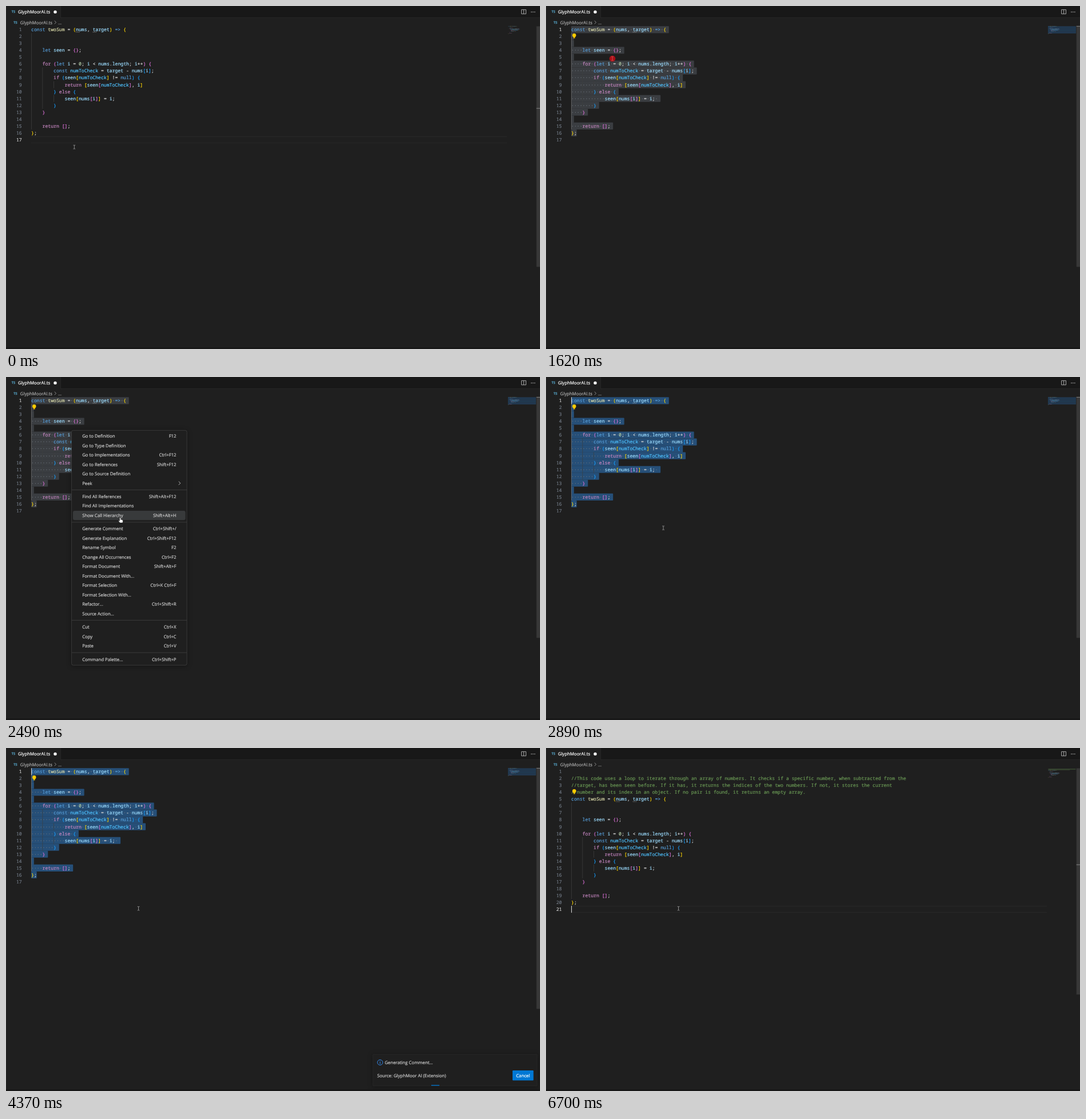
These frames come from a looping animation (933x600 px, 6.84 s). An HTML page:

```html
<!DOCTYPE html>
<html lang="en">
<head>
<meta charset="utf-8">
<title>Comment generator demo</title>
<style>
  html, body { margin: 0; width: 100%; height: 100%; overflow: hidden; background: #1f1f1f; }
  svg { display: block; width: 933px; height: 600px; }
  text { white-space: pre; text-rendering: geometricPrecision; font: 7.75px "Open Sans", "Noto Sans", sans-serif; }
  text, tspan { fill: currentColor; stroke: currentColor; stroke-width: .2px; }
  .code { font: 8.13px "Noto Sans Mono", "DejaVu Sans Mono", monospace; }
  .badge { font-size: 5.8px; font-weight: 700; }
  .end { text-anchor: end; }
  .mid { text-anchor: middle; }
  .shadow { filter: drop-shadow(0 1.3px 4px rgba(0, 0, 0, .36)); }
</style>
</head>
<body>
<svg viewBox="0 0 933 600" xmlns="http://www.w3.org/2000/svg">
  <rect width="933" height="600" fill="#1f1f1f"/>
  <g id="editor"></g>
  <g id="caret"></g>
  <g id="bulb"></g>
  <g id="chrome"></g>
  <g id="toast"></g>
  <rect y="597" width="933" height="3" fill="#181818"/>
  <g id="menu"></g>
  <g id="mouse"></g>
</svg>
<script>
const LOOP = 6840, LINE = 12.04, CHAR = 4.878, TOP = 35.3, LEFT = 44;
const T = {
  press: 400, release: 1340, bulb: 1500, rightClick: 1550, menu: 1740,
  pick: 2700, menuClose: 2880, toast: 2930, insert: 5510,
  bulbMove: 5770, toastEnd: 5580, clear: 6700
};

const CODE = `const twoSum = (nums, target) => {


    let seen = {};

    for (let i = 0; i < nums.length; i++) {
        const numToCheck = target - nums[i];
        if (seen[numToCheck] != null) {
            return [seen[numToCheck], i]
        } else {
            seen[nums[i]] = i;${' '}
        }
    }

    return [];
};
`.split('\n');

const COMMENT = [
  '',
  '//This code uses a loop to iterate through an array of numbers. It checks if a specific number, when subtracted from the',
  '//target, has been seen before. If it has, it returns the indices of the two numbers. If not, it stores the current',
  '//number and its index in an object. If no pair is found, it returns an empty array.'
];

// Indent guides, outermost first: column, first line, last line
const GUIDES = [[0, 2, 15], [4, 7, 12], [8, 9, 9], [8, 11, 11]];

const MENU = [
  ['Go to Definition|F12', 'Go to Type Definition', 'Go to Implementations|Ctrl+F12', 'Go to References|Shift+F12',
    'Go to Source Definition', 'Peek|>'],
  ['Find All References|Shift+Alt+F12', 'Find All Implementations', 'Show Call Hierarchy|Shift+Alt+H'],
  ['Generate Comment|Ctrl+Shift+/', 'Generate Explanation|Ctrl+Shift+F12', 'Rename Symbol|F2',
    'Change All Occurrences|Ctrl+F2', 'Format Document|Shift+Alt+F', 'Format Document With...',
    'Format Selection|Ctrl+K Ctrl+F', 'Format Selection With...', 'Refactor...|Ctrl+Shift+R', 'Source Action...'],
  ['Cut|Ctrl+X', 'Copy|Ctrl+C', 'Paste|Ctrl+V'],
  ['Command Palette...|Ctrl+Shift+P']
];

// Pointer path: time, x, y
const PATH = [
  [70, 119.3, 246.7], [330, 56, 222], [430, 56, 222], [730, 40, 106], [870, 37, 67], [1100, 37, 32],
  [1400, 37, 40], [1560, 116, 92], [1720, 116, 92], [2160, 183, 190.5], [2600, 205, 264],
  [2960, 205, 264], [3500, 231.5, 280.7]
];

const cache = {};
function put(id, markup) {
  if (cache[id] === markup) return;
  cache[id] = markup;
  document.getElementById(id).innerHTML = markup;
}

const esc = s => s.replace(/&/g, '&amp;').replace(/</g, '&lt;');
const rect = (x, y, w, h, fill, more = '') =>
  `<rect x="${x}" y="${y}" width="${w}" height="${h}" fill="${fill}" ${more}/>`;
const text = (x, y, s, color = '#ccc', cls = '') =>
  `<text x="${x}" y="${y}" class="${cls}" style="color:${color}">${s}</text>`;
const stroke = (d, color, width = 1) =>
  `<path d="${d}" fill="none" stroke="${color}" stroke-width="${width}"/>`;
const dots = (x, y, gap, r, fill) =>
  [0, 1, 2].map(i => `<circle cx="${x + i * gap}" cy="${y}" r="${r}" fill="${fill}"/>`).join('');
const lineTop = n => TOP + (n - 1) * LINE;

// Syntax colours, with bracket pairs coloured by depth
const COLORS = { const: '#569cd6', let: '#569cd6', null: '#569cd6', '=>': '#569cd6', twoSum: '#dcdcaa',
  for: '#c586c0', if: '#c586c0', else: '#c586c0', return: '#c586c0', numToCheck: '#4fc1ff', 0: '#b5cea8' };
const PAIRS = ['#ffd700', '#da70d6', '#179fff'];
let depth = 0;
function tokenize(line) {
  return (line.match(/\w+|=>|[()[\]{}]|\s+|[^\w\s()[\]{}]/g) || []).map(s => {
    let color = COLORS[s] || (/^\w/.test(s) ? '#9cdcfe' : '#d4d4d4');
    if (/[([{]/.test(s)) color = PAIRS[depth++ % 3];
    if (/[)\]}]/.test(s)) color = PAIRS[--depth % 3];
    return [s, color];
  });
}
const codeTokens = CODE.map(tokenize);
const commentTokens = COMMENT.map(s => [[s, '#6a9955']]);

function pointer(t) {
  const next = PATH.findIndex(p => p[0] > t);
  if (next === 0) return PATH[0].slice(1);
  if (next < 0) return PATH[PATH.length - 1].slice(1);
  const [t0, x0, y0] = PATH[next - 1], [t1, x1, y1] = PATH[next];
  const k = (t - t0) / (t1 - t0);
  return [x0 + (x1 - x0) * k, y0 + (y1 - y0) * k];
}

function activeLine(t) {
  if (t < T.press) return 17;
  if (t < 1100) {
    const y = pointer(t - 25)[1];
    return Math.max(1, Math.min(16, Math.floor((y - TOP) / LINE) + 1));
  }
  return t < T.insert ? 1 : t < T.clear ? 5 : 21;
}

// The innermost block around the caret gets a brighter guide
function drawGuides(active, shift) {
  const line = active - shift;
  const inner = GUIDES.filter(([, from, to]) => line >= from - 1 && line <= to + 1).pop();
  return GUIDES.map(g => {
    const [col, from, to] = g;
    return rect(LEFT + col * CHAR, lineTop(from + shift), .7, (to - from + 1) * LINE, g === inner ? '#707070' : '#404040');
  }).join('');
}

function drawEditor(active, shift, focused) {
  const lines = shift ? commentTokens.concat(codeTokens) : codeTokens;
  const last = 16 + shift;
  const selecting = active < last;
  const selected = n => selecting && n >= active && n <= last;
  let under = '', over = '', map = '';

  if (!selecting) {
    for (const y of [lineTop(active), lineTop(active + 1) - 1.2])
      under += rect(LEFT, y, 831, 1.2, '#272727');
  }
  lines.forEach((tokens, i) => {
    const n = i + 1, y = lineTop(n) + 8.9, length = tokens.reduce((sum, k) => sum + k[0].length, 0);
    const mapY = 35.4 + i * .84;
    if (selected(n)) {
      const width = (length + (n < last ? 1 : 0)) * CHAR;
      under += rect(LEFT, lineTop(n), width, LINE + .05, focused ? '#264f78' : '#3a3d41', 'rx="1"');
      map += rect(877, mapY, n < last ? 49 : 1, .84, '#264f78', 'opacity=".6"');
    }
    over += text(27.7, y, n, n === active ? '#ccc' : '#6e7681', 'code end');
    let col = 0, spans = '';
    for (const [s, color] of tokens) {
      const blank = !s.trim();
      const shown = blank && selected(n) ? '·'.repeat(s.length) : s;
      spans += `<tspan style="color:${blank ? '#6f777f' : color}">${esc(shown)}</tspan>`;
      if (!blank) map += rect(877.5 + col * .45, mapY, Math.min(s.length * .45, 48), .65, color, 'opacity=".42"');
      col += s.length;
    }
    if (spans) over += `<text class="code" x="${LEFT}" y="${y}">${spans}</text>`;
  });

  const hintY = lineTop(1 + shift) + 10.4;
  const hints = [16, 22].map(c => dots(LEFT + c * CHAR + 1, hintY, 2.4, .6, '#a8a8a8')).join('');

  // Scrollbar covers the text plus one empty page below it
  const page = 564.5, rows = page / LINE, total = lines.length - 1 + rows;
  const bar = rect(926.7, 35.5, 6.3, page * rows / total, '#373737') +
    rect(926.7, 34.8 + (active - 1) * page / total, 6.3, 1.3, '#757575');
  put('editor', under + drawGuides(active, shift) + over + hints + map + bar);
}

function caretOn(t) {
  if (t < T.press) return false;
  if (t < T.rightClick) return true;
  if (t < T.menuClose) return false;
  if (t < T.insert) return Math.floor((t - T.menuClose) / 500) % 2 === 0;
  return t >= T.clear || Math.floor((t - T.insert) / 530) % 2 === 0;
}

function drawBulb(t) {
  const y = t < T.bulbMove ? 51.2 : 75.2;
  put('bulb', t < T.bulb ? '' :
    `<circle cx="49.3" cy="${y}" r="3.2" fill="#ffcc00"/>` +
    rect(47.8, y + 2.2, 3, 1.6, '#ffcc00') + rect(47.9, y + 4.1, 2.8, 1.2, '#ffcc00', 'rx=".5"'));
}

function drawChrome() {
  const file = 'GlyphMoorAI.ts';
  const badge = (x, y) => text(x, y, 'TS', '#519aba', 'badge');
  put('chrome',
    rect(95, 0, 838, 20.5, '#181818') + rect(95, 20, 838, .7, '#2b2b2b') + rect(95, 0, .7, 20.5, '#2b2b2b') +
    rect(0, 0, .7, 597, '#2b2b2b') +
    badge(9.7, 12.4) + text(21, 13.1, file, '#fff') + '<circle cx="86" cy="10.4" r="2.7" fill="#fff"/>' +
    badge(13.2, 30.7) + text(24.8, 31.5, file, '#a9a9a9') + stroke('M84.8 25.8l2.7 2.8-2.7 2.8', '#a9a9a9', .8) +
    text(91, 31.5, '...', '#a9a9a9') +
    stroke('M900.7 6.4h7.8v7.4h-7.8zM904.6 6.4v7.4', '#ccc', .8) + dots(918, 10.5, 2.9, .75, '#ccc'));
}

function drawMenu(t, [mx, my]) {
  if (t < T.menu || t >= T.menuClose) return put('menu', '');
  let y = 103.4, body = '';
  MENU.forEach((group, g) => {
    if (g) {
      body += rect(115, y - 5, 201, .7, '#454545');
      y += 7;
    }
    for (const item of group) {
      const [label, key] = item.split('|');
      if (mx > 117 && Math.abs(my - y) < 8.24)
        body += rect(117, y - 8.2, 196.5, 16.4, '#383a3b', 'rx="3"');
      body += text(133.2, y + 2.8, label);
      if (key === '>') body += stroke(`M301.7 ${y - 3}l3 3-3 3`, '#ccc', .9);
      else if (key) body += text(297.5, y + 2.8, key, '#ccc', 'end');
      y += 16.47;
    }
  });
  put('menu', rect(114.5, 93.3, 201.6, 410.9, '#1f1f1f', 'rx="3" stroke="#454545" stroke-width=".7" class="shadow"') + body);
}

function drawToast(t) {
  if (t < T.toast || t >= T.toastEnd) return put('toast', '');
  const enter = 1 - (1 - Math.min(1, (t - T.toast) / 300)) ** 2;
  const cycle = (t - 2890) % 4000 / 4000;
  const unit = 5.74;
  const step = cycle < .5 ? cycle * 50 : 25 + (cycle - .5) * 49;
  const width = unit * (3 - 4 * Math.abs(cycle - .5));
  put('toast', `<g opacity="${enter}" transform="translate(0 ${(1 - enter) * 55})">` +
    rect(641, 536, 287, 55, '#1f1f1f', 'rx="1" stroke="#2b2b2b" stroke-width=".7" class="shadow"') +
    '<circle cx="653.6" cy="550" r="4.6" fill="none" stroke="#3794ff" stroke-width=".9"/>' +
    rect(653.1, 549.2, 1, 3.4, '#3794ff') + rect(653.1, 547.3, 1, 1, '#3794ff') +
    text(661.7, 553, 'Generating Comment...') +
    text(648.4, 576, 'Source: GlyphMoor AI (Extension)') +
    rect(885, 564, 36.6, 17.5, '#0078d4', 'rx="1.3"') + text(903.2, 575.6, 'Cancel', '#fff', 'mid') +
    rect(641 + unit * (step + .5) - width / 2, 589.5, width, 1.3, '#0078d4') + '</g>');
}

function drawMouse(t, [x, y]) {
  const within = (a, b) => t >= a && t < b;
  const yellow = within(T.press, T.release) || within(T.pick, T.menuClose);
  const red = within(T.rightClick, T.menu - 40);
  const halo = yellow || red
    ? `<circle r="5.3" fill="${red ? '#a80f16' : '#958f10'}"/>` : '';
  const hand = '<path d="M-1 .6Q0-.6 1 .6V3.6Q2 2.9 2.5 4Q3.6 3.4 4 4.7Q5 4.6 4.8 6L4.3 9.3H-.6L-3 6Q-3 4.6-1 5.8Z" fill="#fff" stroke="#111" stroke-width=".5"/>';
  const beam = stroke('M-1.8-3.3H-.5L0-2.8L.5-3.3H1.8M0-2.8V2.8M-1.8 3.3H-.5L0 2.8L.5 3.3H1.8', red ? '#e06a6a' : yellow ? '#4a4705' : '#bdbdbd', .7);
  put('mouse', `<g transform="translate(${x} ${y})">${halo}${within(T.menu, T.menuClose) ? hand : beam}</g>`);
}

function render(t) {
  const active = activeLine(t), spot = pointer(t);
  drawEditor(active, t < T.insert ? 0 : 4, t < T.rightClick || t >= T.menuClose);
  put('caret', caretOn(t) ? rect(LEFT, lineTop(active), 1.1, LINE, '#cfcfcf') : '');
  drawBulb(t);
  drawMenu(t, spot);
  drawToast(t);
  drawMouse(t, spot);
}

drawChrome();
const start = performance.now();
function frame() {
  render((performance.now() - start) % LOOP);
  requestAnimationFrame(frame);
}
render(0);
requestAnimationFrame(frame);
</script>
</body>
</html>
```
